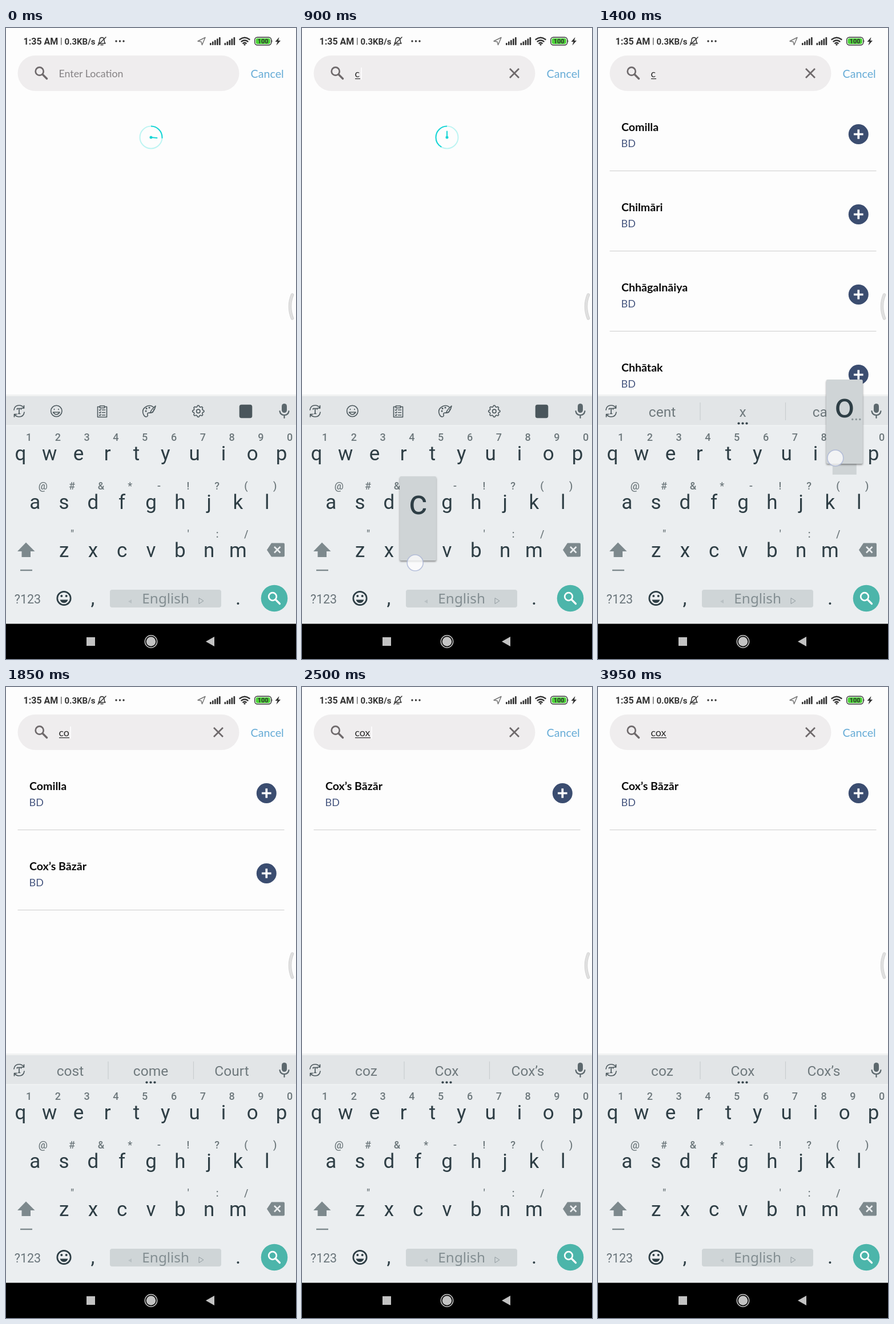
An HTML page for the animation above (4 s loop, 508 by 1102 pixels).

```html
<!DOCTYPE html>
<html lang="en">
<head>
<meta charset="utf-8">
<title>Location search</title>
<style>
html, body { margin: 0; width: 100%; height: 100%; overflow: hidden; background: #fdfdfd; }
svg { display: block; width: 100vw; height: 100vh; }
text { font-family: Roboto, sans-serif; white-space: pre; }
.app { font-family: Lato, sans-serif; }
.mid { text-anchor: middle; }
.line { fill: none; stroke-linecap: round; stroke-linejoin: round; }
#preview rect { filter: drop-shadow(0 2px 1.5px rgba(0, 0, 0, .4)); }
</style>
</head>
<body>
<svg id="stage" viewBox="0 0 508 1102">
  <rect width="508" height="1102" fill="#fdfdfd"/>

  <g id="status" fill="#333">
    <text x="30.5" y="29" font-size="16" font-weight="600">1:35 AM</text>
    <text x="95" y="28" font-size="15">|</text>
    <text id="speed" x="102.5" y="29" font-size="15" font-weight="600"></text>
    <g class="line" stroke="#333" stroke-width="1.5">
      <path d="M162 27h12q-2-2-2-6t-4-4.500q-4 .5-4 4.500t-2 6M166 29.500h4M161 30l14-14"/>
      <path d="M336 23l13-6.500-5.500 13-1.500-5.500z" stroke="#777"/>
    </g>
    <circle cx="193" cy="23" r="1.7"/><circle cx="199.500" cy="23" r="1.7"/><circle cx="206" cy="23" r="1.7"/>
    <g class="line" stroke="#333" stroke-width="2.4">
      <path d="M409.500 20q8.500-6.500 17 0M412.500 23.500q5.500-4 11 0M415.300 26.700q2.700-1.800 5.400 0"/>
    </g>
    <circle cx="418" cy="29" r="1.600"/>
    <rect x="435.700" y="16.200" width="29" height="13.600" rx="4.500" fill="#fff" stroke="#333" stroke-width="1.400"/>
    <rect x="437.500" y="18" width="25.400" height="10" rx="3" fill="#4bd437"/>
    <path d="M465.500 20.500q2 2.500 0 5z"/>
    <text class="mid" x="450.200" y="27" font-size="11" font-weight="700">100</text>
    <path d="M478.500 16l-7 8h4l-2 6.500 7.500-8.500h-4z"/>
  </g>

  <rect x="20.500" y="48" width="388" height="62" rx="31" fill="#efedee"/>
  <g class="line" stroke="#6e696b" stroke-width="2.700">
    <circle cx="58.700" cy="75.700" r="7"/>
    <path d="M64.500 81.500l7 7" stroke-width="3.300"/>
    <path id="clear" d="M364 71l16 16M380 71l-16 16" stroke-linecap="butt"/>
  </g>
  <text id="hint" class="app" x="92.500" y="86" font-size="17.800" fill="#858284">Enter Location</text>
  <text id="query" class="app" x="92.500" y="86" font-size="17.800" fill="#2b2b2b"></text>
  <rect id="underline" x="93" y="88" height="1.200" fill="#2b2b2b"/>
  <rect id="caret" y="69" width="2" height="21" fill="#fcfbfc"/>
  <text class="app" x="428.500" y="87" font-size="19.700" fill="#65abd6">Cancel</text>

  <g id="spinner" class="line" transform="translate(254 191)" stroke="#17d5d6" stroke-width="2">
    <circle r="19.500" stroke="#bdf4f2"/>
    <circle id="arc" r="19.500" pathLength="360" transform="rotate(-90)" stroke-linecap="butt"/>
    <path id="hand" d="M0 0V-10.500"/>
    <circle r="1.500" fill="#17d5d6"/>
  </g>

  <g id="results"></g>
  <path class="line" d="M501.500 466Q493.500 486 501.500 507" stroke="#d0d0d0" stroke-width="5.500"/>
  <path class="line" d="M501.500 466Q493.500 486 501.500 507" stroke="#e0e0e0" stroke-width="3.800"/>

  <rect y="640" width="508" height="4" fill="#f1f2f2"/>
  <rect y="643" width="508" height="52" fill="#e2e5e7"/>
  <rect y="694" width="508" height="346.500" fill="#ebeef0"/>
  <rect y="693.500" width="508" height="1.500" fill="#f2f4f5"/>

  <g class="line" stroke="#4d595e" stroke-width="1.700">
    <path d="M14 667q1-8 9-8 5 0 8 4M31.500 659.500v4.500h-4.500M32 671q-1 8-9 8-5 0-8-4M14.500 679v-4.500h4.500M19.500 666v-1.500h7v1.500M23 664.500v9M21.500 673.500h3"/>
  </g>
  <g id="tools" class="line" stroke="#4d595e" stroke-width="1.600">
    <circle cx="88.300" cy="669" r="9.700"/>
    <path d="M84.500 665.500v1M92 665.500v1M82.500 671q6 8 11.500 0z"/>
    <path d="M164 661.500h-3.500v18h16v-18h-3.500M164.500 660h8v3.500h-8zM163.500 667l1 1 1.500-2M168.500 667h5M163.500 671.500l1 1 1.500-2M168.500 671.500h5M163.500 676l1 1 1.500-2M168.500 676h5"/>
    <path d="M258 662q-5-4-11-1.500-9 4-7 12 2 7 6 6.500 3-1 2-4t3-3q8 1 8-6M253 671q1-4 9-11-2 9-7 12z"/>
    <path d="M245 669h.1M246 664.500h.1M251 663h.1" stroke-width="3"/>
    <path id="gear"/>
    <circle cx="336.800" cy="669.300" r="3.200"/>
    <rect x="409.500" y="658.500" width="21" height="22" rx="3" fill="#4a565c"/>
  </g>
  <g id="suggestions" fill="#6f797d">
    <path d="M179 654v31M328.500 654v31" stroke="#c9cdcf" stroke-width="1.200"/>
    <text class="mid" x="112.500" y="679" font-size="24.500"></text>
    <text class="mid" x="253.500" y="679" font-size="24.500"></text>
    <text class="mid" x="395.500" y="679" font-size="24.500"></text>
    <g fill="#37464d"><circle cx="246.500" cy="690.500" r="2.100"/><circle cx="253.500" cy="690.500" r="2.100"/><circle cx="260.500" cy="690.500" r="2.100"/></g>
  </g>
  <rect x="483" y="656" width="9" height="16" rx="4.500" fill="#5c686d"/>
  <path class="line" d="M479.500 669q1 7 8 7t8-7M487.500 676v5" stroke="#5c686d" stroke-width="2.200"/>

  <rect id="pressed" width="42" height="74" fill="#cfd4d6"/>
  <g id="keys"></g>
  <g fill="#7d898d">
    <path d="M35 898.500l15.500 15.500h-7.500v10h-15.500v-10h-7.500z"/>
    <rect x="25" y="945.800" width="21" height="2.400"/>
    <path d="M465 899.500h21q2 0 2 2v20q0 2-2 2h-21l-8-12z"/>
  </g>
  <path d="M470 906l10.500 10.500M480.500 906l-10.500 10.500" stroke="#ebeef0" stroke-width="2.600"/>
  <text class="mid" x="38" y="1004.500" font-size="21.500" fill="#69747a">?123</text>
  <g fill="#2e3e45">
    <circle cx="101.500" cy="996" r="11.700" fill="none" stroke="#2e3e45" stroke-width="2.700"/>
    <circle cx="97.300" cy="992" r="2"/><circle cx="105.700" cy="992" r="2"/>
    <path d="M94.500 998.500h14q-2 5.500-7 5.500t-7-5.500z"/>
    <text class="mid" x="152" y="1007" font-size="35">,</text>
    <text class="mid" x="406.500" y="1007" font-size="35">.</text>
  </g>
  <rect x="182" y="981" width="195" height="31" rx="4" fill="#cfd5d7"/>
  <text class="mid" x="279.700" y="1004.500" font-size="24.300" fill="#838e92" style="font-family:'Noto Sans',sans-serif">English</text>
  <path d="M220 998v7l-6-3.500z" fill="#b9c1c4"/>
  <path d="M338 995.500v10l8-5z" fill="none" stroke="#919b9f"/>
  <circle cx="470" cy="996" r="23.300" fill="#4cb5aa"/>
  <g class="line" stroke="#fff" stroke-width="2.700">
    <circle cx="467" cy="993" r="6.800"/><path d="M472.500 998.500l7 7" stroke-width="3.200"/>
  </g>

  <rect y="1040.500" width="508" height="62"/>
  <g fill="#c3c3c3">
    <rect x="141" y="1064" width="15" height="15"/>
    <circle cx="254" cy="1071.500" r="8.300"/>
    <circle cx="254" cy="1071.500" r="10.700" fill="none" stroke="#c3c3c3" stroke-width="1.500"/>
    <path d="M365 1063v17l-15-8.500z"/>
  </g>

  <g id="preview">
    <rect x="-32" y="-129" width="64" height="147" rx="2.500" fill="#cfd4d6"/>
    <text class="mid" y="-63" font-size="61" fill="#2e3e45"></text>
    <g id="more" fill="#8d979b"><circle cx="14" cy="-59.500" r="1.700"/><circle cx="20.500" cy="-59.500" r="1.700"/><circle cx="27" cy="-59.500" r="1.700"/></g>
  </g>
  <circle id="touch" r="14" fill="#fff" fill-opacity=".72" stroke="#a9b4d4" stroke-opacity=".8" stroke-width="1.600"/>
</svg>
<script>
const LOOP = 4000, FRAME = 50, SWEEP = 682;
const $ = id => document.getElementById(id);
const show = (el, on) => el.setAttribute('visibility', on ? 'visible' : 'hidden');

function add(parent, tag, attrs, content = '') {
  const el = document.createElementNS('http://www.w3.org/2000/svg', tag);
  for (const name in attrs) el.setAttribute(name, attrs[name]);
  el.textContent = content;
  return parent.appendChild(el);
}

function setText(el, value) {
  if (el.textContent !== value) el.textContent = value;
}

// Signal bars
for (const left of [357, 382.5])
  for (let i = 0; i < 5; i++)
    add($('status'), 'rect', { x: left + i * 4, y: 26 - i * 2.5, width: 2.7, height: 4 + i * 2.5, rx: 1 });

// Gear outline: radius follows a softened square wave
let gear = '';
for (let i = 0; i < 64; i++) {
  const a = i / 64 * 2 * Math.PI;
  const r = 9 + Math.tanh(3 * Math.cos(8 * a)) * 1.1;
  gear += `${i ? 'L' : 'M'}${336.8 + r * Math.sin(a)} ${669.3 - r * Math.cos(a)}`;
}
$('gear').setAttribute('d', gear + 'z');

// Keyboard
const PITCH = 50.8;
const ROWS = [
  { keys: 'qwertyuiop', hints: '1234567890', x: 25.4, y: 743, hintDx: 14.6 },
  { keys: 'asdfghjkl', hints: '@#&*-!?()', x: PITCH, y: 827.5, hintDx: 14 },
  { keys: 'zxcvbnm', hints: '"   \':/', x: 2 * PITCH, y: 912, hintDx: 14.5 }
];
const keyAt = {};
for (const row of ROWS)
  [...row.keys].forEach((key, i) => {
    const x = row.x + i * PITCH;
    keyAt[key] = { x, y: row.y };
    add($('keys'), 'text', { class: 'mid', x, y: row.y + 12, 'font-size': 35, fill: '#2e3e45' }, key);
    const shift = row.hints[0] === '"' && i === 0 ? 0 : row.hintDx;
    add($('keys'), 'text', {
      class: 'mid', x: x + shift + (shift ? 0 : 14.5), y: row.y - 22,
      'font-size': 18, 'font-weight': 500, fill: '#6c777b'
    }, row.hints[i]);
  });

// Result rows
const rows = [0, 1, 2, 3].map(i => {
  const g = add($('results'), 'g', { transform: `translate(0 ${i * 140})` });
  const name = add(g, 'text', { class: 'app', x: 41, y: 180, 'font-size': 19.6, 'font-weight': 700, fill: '#0a0a0a' });
  add(g, 'text', { class: 'app', x: 40.5, y: 208, 'font-size': 18, fill: '#46567f' }, 'BD');
  add(g, 'circle', { cx: 456.3, cy: 185.5, r: 17.5, fill: '#3b4d70' });
  add(g, 'path', { d: 'M448 185.500h16.600M456.300 177.200v16.600', stroke: '#fff', 'stroke-width': 3.7 });
  add(g, 'path', { d: 'M20.500 249.500h467', stroke: '#cdcdcd' });
  return { g, name };
});

// Timeline tables: [start ms, value]
const QUERY = [[0, ''], [900, 'c'], [1450, 'co'], [2250, 'cox']];
const WORDS = [
  [0, null], [950, ['cent', 'x', 'can']],
  [1500, ['cost', 'come', 'Court']], [2300, ['coz', 'Cox', 'Cox’s']]
];
const RESULTS = [
  [0, []], [1050, ['Comilla', 'Chilmāri', 'Chhāgalnāiya', 'Chhātak']],
  [1600, ['Comilla', 'Cox’s Bāzār']], [2400, ['Cox’s Bāzār']]
];
const SPEED = [[0, '0.3KB/s'], [3600, '0.0KB/s']];
const TAPS = [
  { key: 'c', down: 800, up: 900, dx: -5, dy: 22 },
  { key: 'o', down: 1350, up: 1450, dx: -16, dy: 8, more: true },
  { key: 'x', down: 2150, up: 2250, dx: -5, dy: 20 }
];
const CARET_X = [92, 103, 112, 121];
const stepAt = (table, t) => table.findLast(([start]) => start <= t);

function drawSpinner(t) {
  const phase = (t / SWEEP + 0.264) % 2;
  const growing = phase < 1;
  const angle = (phase % 1) * 360;
  $('arc').setAttribute('stroke-dasharray', growing ? `${angle} 360` : `0 ${angle} ${360 - angle} 0`);
  $('hand').setAttribute('transform', `rotate(${growing ? angle : 0})`);
}

function drawField(t) {
  const [typedAt, query] = stepAt(QUERY, t);
  const n = query.length;
  setText($('query'), query);
  show($('hint'), !n);
  show($('clear'), n);
  show($('underline'), n);
  $('underline').setAttribute('width', Math.max(0, CARET_X[n] - 94));
  $('caret').setAttribute('x', CARET_X[n]);
  const blink = n ? t - typedAt : t + 750;
  show($('caret'), blink % 1000 < 500);
}

function drawResults(t) {
  const [, names] = stepAt(RESULTS, t);
  rows.forEach(({ g, name }, i) => {
    show(g, i < names.length);
    setText(name, names[i] || '');
  });
  show($('spinner'), !names.length);
}

function drawTap(t) {
  const tap = TAPS.find(({ down, up }) => t >= down && t < up + FRAME);
  show($('preview'), tap);
  show($('touch'), tap);
  show($('pressed'), tap && t < tap.up);
  show($('more'), tap && tap.more);
  if (!tap) return;
  const { x, y } = keyAt[tap.key];
  $('preview').setAttribute('transform', `translate(${x} ${y})`);
  setText($('preview').querySelector('text'), tap.key);
  $('pressed').setAttribute('x', x - 21);
  $('pressed').setAttribute('y', y - 37);
  $('touch').setAttribute('cx', x + tap.dx);
  $('touch').setAttribute('cy', y + tap.dy);
}

function draw(t) {
  drawSpinner(t);
  drawField(t);
  drawResults(t);
  drawTap(t);
  setText($('speed'), stepAt(SPEED, t)[1]);
  const [, words] = stepAt(WORDS, t);
  show($('tools'), !words);
  show($('suggestions'), words);
  if (words) $('suggestions').querySelectorAll('text').forEach((el, i) => setText(el, words[i]));
}

const began = performance.now();
function tick() {
  const t = (performance.now() - began) % LOOP;
  draw(Math.floor(t / FRAME) * FRAME);
  requestAnimationFrame(tick);
}
tick();
</script>
</body>
</html>
```
